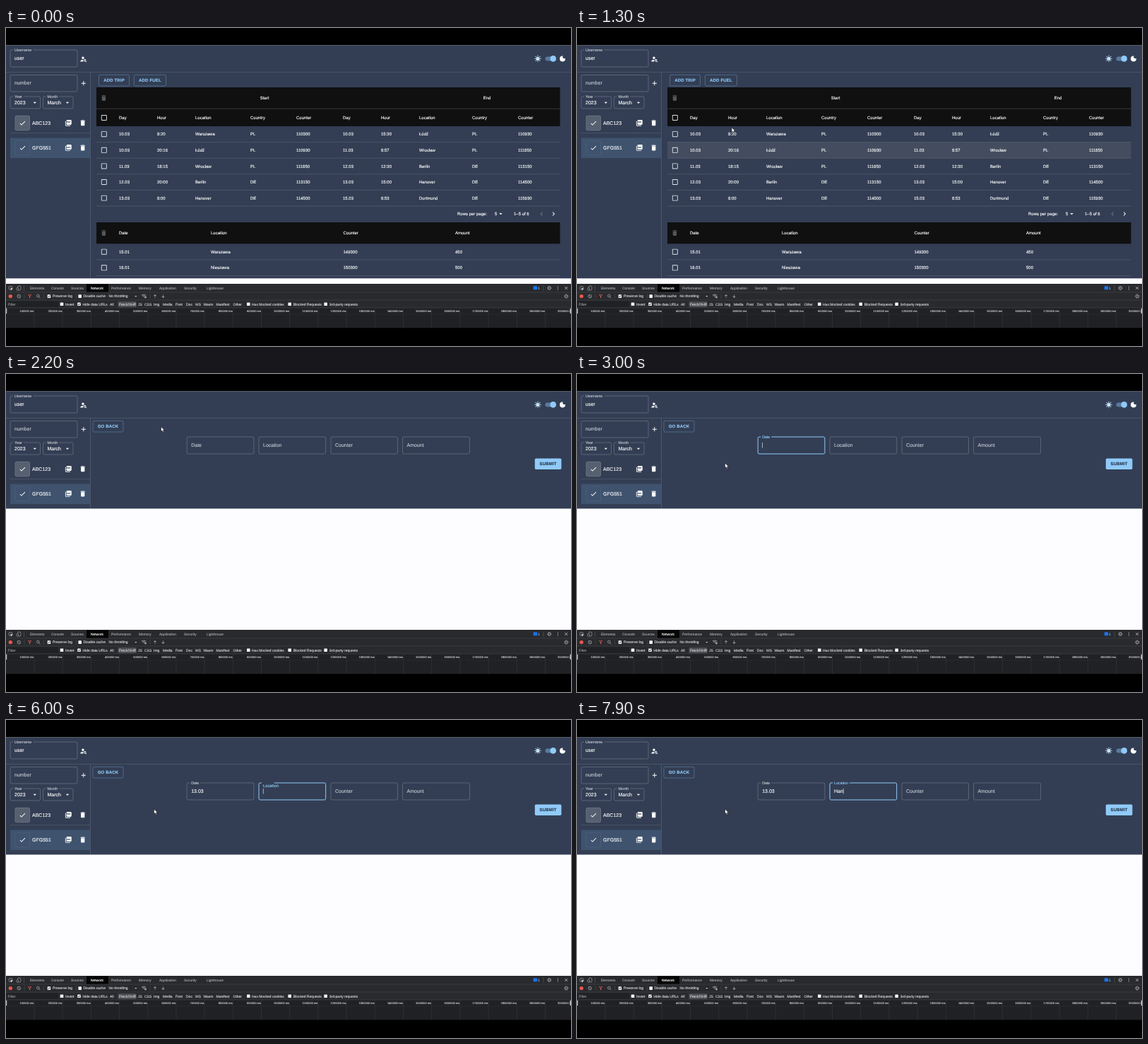
Animation of 800x450 px, one loop 8 s. Source, as an HTML page:

```html
<!DOCTYPE html>
<html lang="en">
<head>
<meta charset="utf-8">
<title>Trip log</title>
<style>
  html, body { margin: 0; width: 100%; height: 100%; overflow: hidden; background: #000; }
  svg { display: block; width: 100vw; height: 100vh; }
  text { font-family: "Liberation Sans", Arial, sans-serif; text-rendering: geometricPrecision; white-space: pre; }
</style>
</head>
<body>
<svg id="stage" viewBox="0 0 800 450">
  <g id="shell"></g>
  <g id="list"></g>
  <g id="form"></g>
  <g id="devtools"></g>
  <g id="live"></g>
</svg>
<script>
const LOOP = 8000;
const BG = '#333e54', BLUE = '#90caf9', WHITE = '#fff', HEAD = '#101011';
const LINE = 'rgba(255,255,255,.16)', OUTLINE = 'rgba(255,255,255,.33)', SOFT = '#c3c8d0';
const $ = id => document.getElementById(id);

// Drawing helpers: y is the vertical centre of a text or icon.
const rect = (x, y, w, h, fill, extra = '') =>
  `<rect x="${x}" y="${y}" width="${w}" height="${h}" fill="${fill}" ${extra}/>`;
const text = (x, y, s, size = 6, fill = WHITE, extra = '') =>
  `<text x="${x}" y="${y + size * .36}" font-size="${size}" fill="${fill}" stroke="${fill}" stroke-width=".13" ${extra}>${s}</text>`;
const line = (x1, y1, x2, y2, stroke = LINE, w = .7) =>
  `<path d="M${x1} ${y1}L${x2} ${y2}" stroke="${stroke}" stroke-width="${w}"/>`;
const circle = (x, y, r, fill, extra = '') =>
  `<circle cx="${x}" cy="${y}" r="${r}" fill="${fill}" ${extra}/>`;
const icon = (name, x, y, fill = WHITE, size = 10.6) =>
  `<path d="${ICONS[name]}" fill="${fill}" transform="translate(${x - size / 2} ${y - size / 2}) scale(${size / 24})"/>`;
const outline = (x, y, w, h, stroke = OUTLINE, sw = .6, fill = 'none') =>
  rect(x, y, w, h, fill, `rx="1.8" stroke="${stroke}" stroke-width="${sw}"`);

const ICONS = {
  bin: 'M6 19c0 1.1.9 2 2 2h8c1.1 0 2-.9 2-2V7H6zM19 4h-3.5l-1-1h-5l-1 1H5v2h14z',
  check: 'M9 16.17 4.83 12l-1.42 1.41L9 19 21 7l-1.41-1.41z',
  box: 'M19 5v14H5V5h14m0-2H5c-1.1 0-2 .9-2 2v14c0 1.1.9 2 2 2h14c1.1 0 2-.9 2-2V5c0-1.1-.9-2-2-2z',
  plus: 'M19 13h-6v6h-2v-6H5v-2h6V5h2v6h6z',
  drop: 'M7 10l5 5 5-5z',
  left: 'M15.41 7.41 14 6l-6 6 6 6 1.41-1.41L10.83 12z',
  right: 'M10 6 8.59 7.41 13.17 12l-4.58 4.59L10 18l6-6z',
  moon: 'M12 3a9 9 0 1 0 9 9c0-.46-.04-.92-.1-1.36a5.4 5.4 0 0 1-7.54-7.54C12.9 3.04 12.46 3 12 3z',
  pages: 'M8 2h12l2 2v12l-2 2H8l-2-2V4zM4 6H2v14l2 2h14v-2H4z',
  person: 'M10 12a4 4 0 1 0 0-8 4 4 0 0 0 0 8zm.4 2C7.6 13.9 2 15.3 2 18v2h9.5c-2.4-2.8-1.2-5.9-1.1-6zm9 4a4 4 0 1 0-1.4 1.4l2.6 2.6 1.4-1.4zM16 18a2 2 0 1 1 0-4 2 2 0 0 1 0 4z',
  funnel: 'M3 3h18l-7 9v8l-4-2v-6zM7 5l5 6 5-6z',
  up: 'M11 20V8l-4 4-2-2 7-7 7 7-2 2-4-4v12z',
  down: 'M11 3v12l-4-4-2 2 7 7 7-7-2-2-4 4V3z'
};

// Outlined input whose label sits in a gap of the top border when raised.
function field(x, y, w, h, label, { value = '', lift = 1, focus = false, hover = false, fill } = {}) {
  const size = 7 - 1.75 * lift, restY = y + h / 2 - .3;
  const border = focus ? BLUE : hover ? WHITE : OUTLINE;
  const labelY = restY + (y - restY) * lift;
  const gap = lift > .2 ? rect(x + 4, y - 1, (measure(label) * size / 7 + 4) * Math.min(1, lift), 2, BG) : '';
  return outline(x, y, w, h, border, focus ? 1 : .6) + gap +
    text(x + 6, labelY, label, size, focus ? BLUE : fill || SOFT) + text(x + 6, restY, value, 7);
}

function button(x, y, w, h, label, hover = 0) {
  return outline(x, y, w, h, `rgba(144,202,249,${.5 + .5 * hover})`, .6, `rgba(144,202,249,${.1 * hover})`) +
    text(x + w / 2, y + h / 2 - .2, label, 6, BLUE, 'text-anchor="middle" font-weight="bold" letter-spacing=".17"');
}

const pen = document.createElement('canvas').getContext('2d');
function measure(s) {
  pen.font = '70px "Liberation Sans", Arial, sans-serif';
  return pen.measureText(s).width / 10;
}

function vehicle(y, plate, active) {
  const bg = active ? '#3f536e' : BG;
  return (active ? rect(6, y - 13.8, 113, 28.5, bg) : '') +
    outline(13, y - 10, 20.5, 20.5, active ? '#53657d' : '#7d8691', .6, active ? 'none' : '#566070') +
    icon('check', 23.3, y + .3) + text(37, y - .2, plate, 7) +
    icon('pages', 88.3, y) + text(85.6, y - .9, 'PDF', 2.9, bg, 'font-weight="bold"') + icon('bin', 108.7, y);
}

function drawShell() {
  const rays = Array.from({ length: 8 }, (_, i) =>
    `<path d="M753 38.7v1.5" stroke="#c4e2fb" stroke-width="1" transform="rotate(${i * 45} 753 43.4)"/>`).join('');
  $('shell').innerHTML = rect(0, 24.5, 800, 338, '#fdfcff') + `<rect id="page" y="24.5" width="800" height="330" fill="${BG}"/>` +
    line(0, 62.5, 800, 62.5) + `<path id="side" stroke="${LINE}" stroke-width=".8"/>` +
    field(6, 31, 95, 24, 'Username', { value: 'user' }) + icon('person', 109.8, 44) +
    circle(753, 43.4, 2.6, '#c4e2fb') + rays +
    rect(763.5, 40.4, 14, 6, '#587a9c', 'rx="3"') + circle(774.7, 43.4, 4.3, BLUE) + icon('moon', 788, 43.4) +
    field(6, 66.5, 95, 23.5, 'number', { lift: 0 }) + icon('plus', 109.8, 78.2) +
    field(6, 97, 42.5, 17, 'Year', { value: '2023' }) + icon('drop', 40.8, 105.6) +
    field(52.5, 97, 42.5, 17, 'Month', { value: 'March' }) + icon('drop', 87, 105.6) +
    vehicle(134.3, 'ABC123', false) + line(6, 148.7, 119, 148.7) + vehicle(169.4, 'GFG551', true);
}

const COLS = [160, 214, 268, 346, 411, 477, 531, 585, 660, 725];
const TRIPS = [
  'Day|Hour|Location|Country|Counter|Day|Hour|Location|Country|Counter',
  '10.03|8:20|Warszawa|PL|110300|10.03|15:30|Łódź|PL|110930',
  '10.03|20:16|Łódź|PL|110930|11.03|8:57|Wrocław|PL|111850',
  '11.03|18:15|Wrocław|PL|111850|12.03|12:30|Berlin|DE|113150',
  '12.03|20:00|Berlin|DE|113150|12.03|15:00|Hanover|DE|114500'.replace('|12.03|15', '|13.03|15'),
  '13.03|8:00|Hanover|DE|114500|15.03|8:53|Dortmund|DE|115930'
];
const FUEL_COLS = [160, 290, 477.5, 636];
const FUEL = ['Date|Location|Counter|Amount', '15.01|Warszawa|149300|450', '16.01|Nieszawa|150300|500'];
const ROWS = [0, 1, 2, 3, 4].map(i => 139 + i * 22.6).concat(305.3, 327.9);
const cells = (row, cols, y) => row.split('|').map((s, i) => text(cols[i], y, s)).join('');

function drawList() {
  let out = rect(128, 84, 656.5, 55, HEAD) + line(128, 114.3, 784.5, 114.3, '#4a4b4e') +
    icon('bin', 138.4, 99, '#55565a') + text(366, 99, 'Start', 6, WHITE, 'text-anchor="middle"') +
    text(681, 99, 'End', 6, WHITE, 'text-anchor="middle"');
  TRIPS.forEach((row, i) => {
    const y = i ? ROWS[i - 1] + 11.2 : 127;
    out += icon('box', 138.8, y, '#e3e6ea') + cells(row, COLS, y);
    if (i) out += line(128, ROWS[i - 1] + 22.6, 784.5, ROWS[i - 1] + 22.6);
  });
  out += text(639, 263, 'Rows per page:') + text(692, 263, '5') + icon('drop', 700.5, 263) +
    text(719, 263, '1–5 of 6') + icon('left', 758.3, 263, '#737b8a') + icon('right', 775.3, 263);
  out += rect(128, 275, 656.5, 30.3, HEAD) + icon('bin', 138.4, 290, '#55565a');
  FUEL.forEach((row, i) => {
    const y = i ? ROWS[i + 4] + 11.4 : 290;
    out += cells(row, FUEL_COLS, y);
    if (i) out += icon('box', 138.8, y, '#e3e6ea') + line(128, ROWS[i + 4] + 22.6, 784.5, ROWS[i + 4] + 22.6);
  });
  $('list').innerHTML = `<g id="rowHover"></g>` + out;
}

function drawForm() {
  $('form').innerHTML = button(123, 66.3, 43, 15.7, 'GO BACK') +
    field(460, 89, 94.5, 24, 'Counter', { lift: 0 }) + field(561.5, 89, 95, 24, 'Amount', { lift: 0 }) +
    rect(748.8, 119.5, 37.6, 15.5, BLUE, 'rx="1.8"') +
    text(767.6, 127, 'SUBMIT', 6, '#26384c', 'text-anchor="middle" font-weight="bold" letter-spacing=".17"');
}

function drawDevtools() {
  const grey = '#a3a6aa', pale = '#d3d5d8';
  const labels = (y, size, fill, items) => Object.entries(items).map(([s, x]) => text(x, y, s, size, fill)).join('');
  const tick = (x, y, on) => rect(x - 2.3, y - 2.3, 4.6, 4.6, '#f2f2f2', 'rx=".6"') +
    (on ? `<path d="M${x - 1.4} ${y}l1 1.2 1.9-2.5" fill="none" stroke="#222" stroke-width=".8"/>` : '');
  const gear = (x, y) => circle(x, y, 1.7, 'none', `stroke="${grey}" stroke-width="1"`) +
    circle(x, y, 2.7, 'none', `stroke="${grey}" stroke-width=".9" stroke-dasharray="1.06"`);
  let out = rect(0, 362, 800, 62.5, '#292a2d') + rect(0, 396, 800, 28.5, '#202124') +
    rect(114, 362.5, 31, 11.5, '#050505') +
    [374, 385, 396].map(y => line(0, y, 800, y, '#44464a', .6)).join('') +
    labels(368.3, 4.9, grey, { Elements: 34, Console: 64, Sources: 92, Performance: 149, Memory: 188, Application: 217, Security: 252, Lighthouse: 284 }) +
    text(120, 368.3, 'Network', 4.9, WHITE);
  out += outline(4, 365.5, 5, 5, grey, .7) + `<path d="M6 367.5l4 1.5-1.8.7-.7 1.8z" fill="${pale}"/>` +
    outline(16.5, 365, 4.5, 6, grey, .7) + outline(14.8, 367.5, 3, 3.8, grey, .7, '#292a2d') + line(25.5, 364.5, 25.5, 372, '#55575b') +
    rect(746.7, 365.2, 5.6, 5, '#1a73e8', 'rx=".8"') + text(753.3, 368, '1', 4.9, '#8ab4f8') + line(761, 364.5, 761, 372, '#55575b') +
    gear(769.3, 368) + [-2, 0, 2].map(d => circle(781.4, 368 + d, .6, pale)).join('') +
    line(791.2, 366, 795.2, 370, pale) + line(795.2, 366, 791.2, 370, pale);
  out += circle(6.3, 379.6, 2.7, '#e8574f') + circle(18.3, 379.6, 2.3, 'none', `stroke="${grey}" stroke-width=".8"`) +
    line(16.7, 378, 19.9, 381.2, grey) + icon('funnel', 33.6, 379.8, '#ee6055', 7) +
    circle(45.3, 379, 1.8, 'none', `stroke="${grey}" stroke-width=".8"`) + line(46.6, 380.4, 48.4, 382.2, grey, .9) +
    [26, 53.5, 99.5, 204].map(x => line(x, 376.3, x, 383, '#55575b', .5)).join('') +
    tick(60.9, 379.6, true) + tick(104.7, 379.6) +
    labels(379.6, 5, pale, { 'Preserve log': 66, 'Disable cache': 109.5, 'No throttling': 145.5 }) + icon('drop', 183.8, 379.6, pale, 8) +
    [1, 2.6, 4.2].map(r => `<path d="M${195 - r * .8} ${381 - r * .7}q${r * .8} ${-r * .5} ${r * 1.6} 0" fill="none" stroke="${grey}" stroke-width=".8"/>`).join('') +
    circle(197.5, 381, 1.4, grey) +
    icon('up', 211, 379.6, grey, 7) + icon('down', 222.5, 379.6, grey, 7) + gear(793.3, 379.6);
  out += rect(0, 386.5, 74, 8.5, '#202124') + text(2.5, 391, 'Filter', 5, '#8d9094') + rect(158.5, 387, 26, 8, '#4c4e53', 'rx="1"') +
    [79, 343.3, 401.7, 452.6].map(x => tick(x, 390.8)).join('') + tick(103.5, 390.8, true) +
    labels(391, 5, pale, {
      Invert: 84, 'Hide data URLs': 108.5, All: 147, 'Fetch/XHR': 160, JS: 187, CSS: 196, Img: 209, Media: 222, Font: 240, Doc: 255,
      WS: 268, Wasm: 279.5, Manifest: 297.5, Other: 321.5, 'Has blocked cookies': 348, 'Blocked Requests': 406.7, '3rd-party requests': 457.7
    });
  for (let i = 1; i <= 20; i++) {
    const x = 39.3 + 40.2 * (i - 1);
    out += line(x + .6, 396.5, x + .6, 424.5, '#36383c', .6) + text(x, 400.8, `${i}00000 ms`, 4, pale, 'text-anchor="end"');
  }
  out += line(0, 405, 800, 405, '#303236', .5) + rect(0, 396.8, 1.2, 7.2, '#c8c9cb') + rect(798.6, 396.8, 1.4, 7.2, '#c8c9cb');
  $('devtools').innerHTML = out + rect(0, 424.5, 800, 26, '#000');
}

// Timeline: [ms, x, y] for the pointer, [ms, value] for typing.
const POINTER = [
  [900, 113, 415], [1000, 205, 245], [1100, 215.3, 222.5], [1200, 218, 170], [1400, 220, 112], [1700, 219.3, 74.5],
  [2200, 219.3, 74.5], [2500, 268, 97], [2700, 276, 101], [2800, 266, 104], [2900, 209.5, 126]
];
const DATE = [[0, ''], [4450, '1'], [4850, '13'], [5050, '13.'], [5250, '13.0'], [5450, '13.03']];
const PLACE = [[0, ''], [7600, 'H'], [7700, 'Ha'], [7850, 'Han']];
const OPEN = 2150, FOCUS_DATE = 2790, FOCUS_PLACE = 5900;

const latest = (steps, t) => steps.filter(s => s[0] <= t).pop();
const clamp = v => Math.max(0, Math.min(1, v));

function pointer(t) {
  if (t < POINTER[0][0]) return null;
  const i = POINTER.findIndex(p => p[0] > t);
  if (i < 0) return POINTER[POINTER.length - 1].slice(1);
  const [a, b] = [POINTER[i - 1], POINTER[i]], k = (t - a[0]) / (b[0] - a[0]);
  return [a[1] + (b[1] - a[1]) * k, a[2] + (b[2] - a[2]) * k];
}

// cubic-bezier(0, 0, .2, 1)
function easeOut(x) {
  let lo = 0, hi = 1;
  for (let i = 0; i < 18; i++) {
    const s = (lo + hi) / 2;
    if (.6 * s * s * (1 - s) + s ** 3 < x) lo = s; else hi = s;
  }
  return 3 * lo * lo * (1 - lo) + lo ** 3;
}

function input(t, x, label, steps, focusAt, blurAt, liftAt, hover) {
  const focus = t >= focusAt && t < blurAt;
  const [since, value] = latest(steps, t);
  const caretOn = Math.floor((t - Math.max(since, focusAt)) / 505) % 2 === 0;
  const caretX = x + 6.3 + measure(value);
  return field(x, 89, 94.7, 24, label, { value, lift: easeOut(clamp((t - liftAt) / 200)), focus, hover }) +
    (focus && caretOn ? line(caretX, 97, caretX, 104.6, WHITE, .6) : '');
}

function render(t) {
  const open = t >= OPEN, bottom = open ? 190.5 : 354.3;
  $('page').setAttribute('height', bottom - 24.5);
  $('side').setAttribute('d', `M119.5 62.5V${bottom}`);
  $('list').style.display = open ? 'none' : '';
  $('form').style.display = open ? '' : 'none';

  let out = '';
  const at = pointer(t);
  if (open) {
    const overDate = at[0] > 256 && at[1] > 89 && at[1] < 113;
    out += input(t, 256.2, 'Date', DATE, FOCUS_DATE, FOCUS_PLACE, FOCUS_DATE, overDate) +
      input(t, 358, 'Location', PLACE, FOCUS_PLACE, LOOP, FOCUS_PLACE + 35, false);
  } else {
    const lagged = pointer(t - 80);
    const row = lagged ? ROWS.find(y => lagged[1] >= y && lagged[1] < y + 22.6) : undefined;
    $('rowHover').innerHTML = row ? rect(128, row, 656.5, 22.6, '#434d5f') : '';
    out += button(131.5, 66.3, 43, 15.7, 'ADD TRIP') + button(181.3, 66.3, 45.2, 15.7, 'ADD FUEL', clamp((t - 1650) / 250));
  }
  if (at) out += `<path d="M0 0v7l1.6-1.5 1.1 2.4 1.3-.6-1.1-2.3h2.2z" fill="#fff" stroke="#111" stroke-width=".6" transform="translate(${at[0]} ${at[1]})"/>`;
  $('live').innerHTML = out;
}

drawShell();
drawList();
drawForm();
drawDevtools();
const start = performance.now();
function tick() {
  render((performance.now() - start) % LOOP);
  requestAnimationFrame(tick);
}
tick();
</script>
</body>
</html>
```
